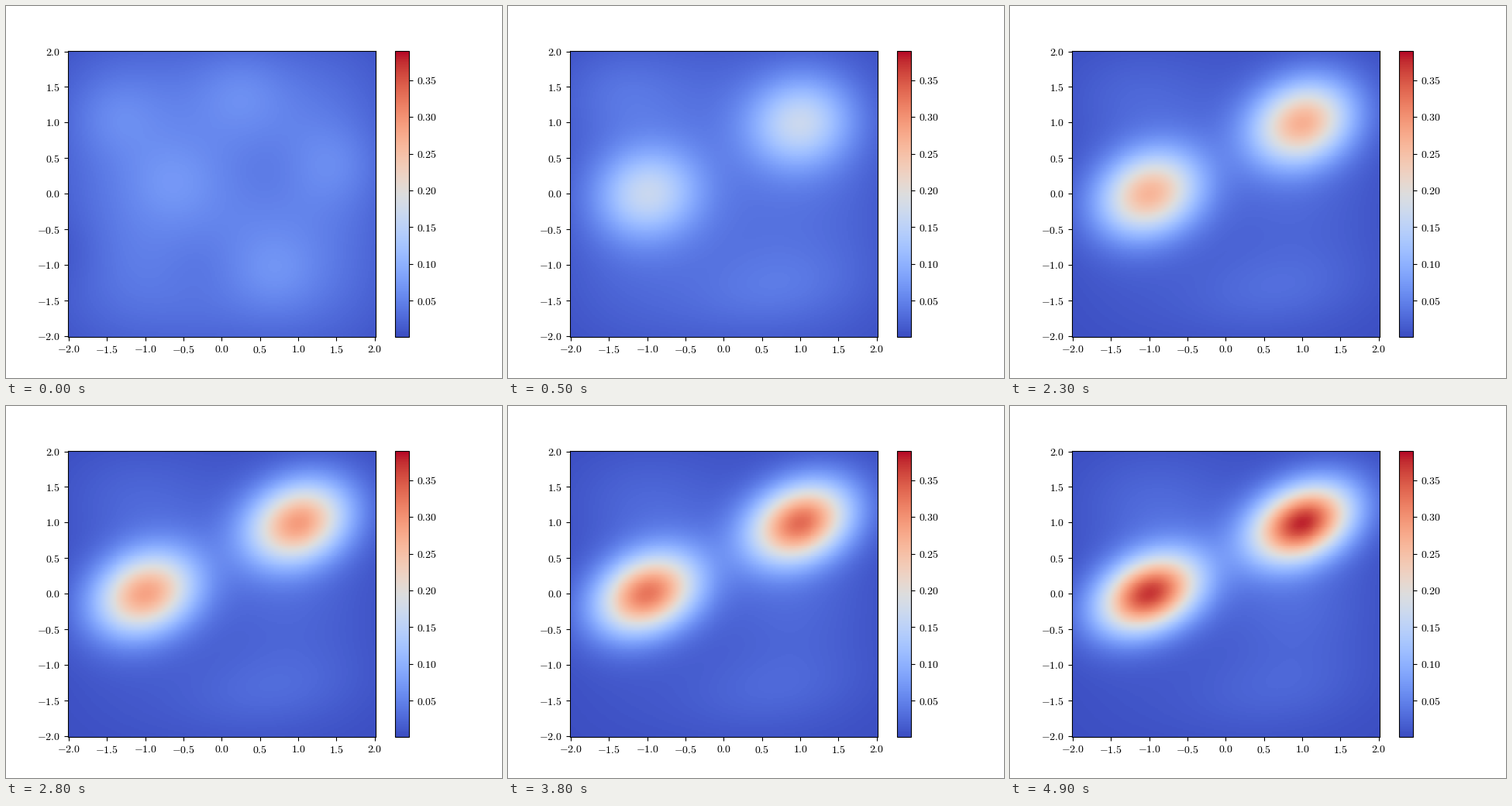
Animation of 640 by 480 pixels, one loop 5 s. Source, as a matplotlib script:

```python
import numpy as np
import matplotlib.pyplot as plt
from matplotlib.animation import FuncAnimation
from matplotlib.ticker import FormatStrFormatter, MultipleLocator

plt.rcParams["mathtext.fontset"] = "cm"
plt.rcParams["font.family"] = "Liberation Serif"  # line height close to the math font

FRAMES, INTERVAL = 50, 100
CELLS, LIMIT = 200, 2.01
VMIN, VMAX = 0.0003, 0.3905

edges = np.linspace(-LIMIT, LIMIT, CELLS + 1)
centres = (edges[:-1] + edges[1:]) / 2
X, Y = np.meshgrid(centres, centres)


def bump(x, y, sx, sy, rho=0.0):
    """Gaussian hill of height one; rho tilts it."""
    u, v = (X - x) / sx, (Y - y) / sy
    return np.exp(-(u * u - 2 * rho * u * v + v * v) / (2 * (1 - rho * rho)))


def hills(points, size):
    return sum(bump(x, y, size, size) for x, y in points)


# Fixed shapes whose strength changes over time
plateau = np.exp(-(X / 2.11) ** 4 - (Y / 2.11) ** 4)
warm = hills([(-1.4, 1.1), (-0.65, 0.15), (1.5, 0.4), (0.25, 1.45), (0.7, -1.1)], 0.4)
cool = hills([(0.6, 0.35), (-0.3, -1.0), (-2.0, -0.8)], 0.38)
start = 0.02 * warm - 0.01 * cool
halo = hills([(-0.8, 1.0), (0.9, -0.1)], 0.6)
top_patch = bump(-1.35, 1.45, 0.55, 0.4)
low_patch = bump(0.65, -1.35, 0.75, 0.38, 0.25)


def density(frame):
    if frame == 4:  # the picture rests for one step
        frame = 3
    t = frame * INTERVAL / 1000
    part = frame / (FRAMES - 1)
    rise = 1 - np.exp(-t / 0.35)
    fade = 1 / (1 + 1.5 * t)

    height = 0.15 * rise + 0.205 * part
    peak = (0.465, 0.445 - 0.06 * part, 0.3 * part**0.7)
    return (
        (0.006 + 0.046 * fade) * plateau
        + (1 - rise) ** 2 * start
        + 0.018 * part * halo
        + 0.035 * rise * fade * top_patch
        + 0.02 * rise * (1 - 0.35 * part) * low_patch
        + height * (bump(-1, 0, *peak) + 1.03 * bump(1, 1, *peak))
    )


fig, ax = plt.subplots(figsize=(6.4, 4.8), dpi=100)
mesh = ax.pcolormesh(edges, edges, density(0), cmap="coolwarm", vmin=VMIN, vmax=VMAX)
bar = fig.colorbar(mesh, ax=ax, ticks=MultipleLocator(0.05))
bar.ax.yaxis.set_major_formatter(FormatStrFormatter("$%.2f$"))
for axis in (ax.xaxis, ax.yaxis):
    axis.set_major_locator(MultipleLocator(0.5))
    axis.set_major_formatter(FormatStrFormatter("$%.1f$"))


def update(frame):
    mesh.set_array(density(frame))
    return (mesh,)


anim = FuncAnimation(fig, update, frames=FRAMES, interval=INTERVAL, repeat=True)
plt.show()
```
